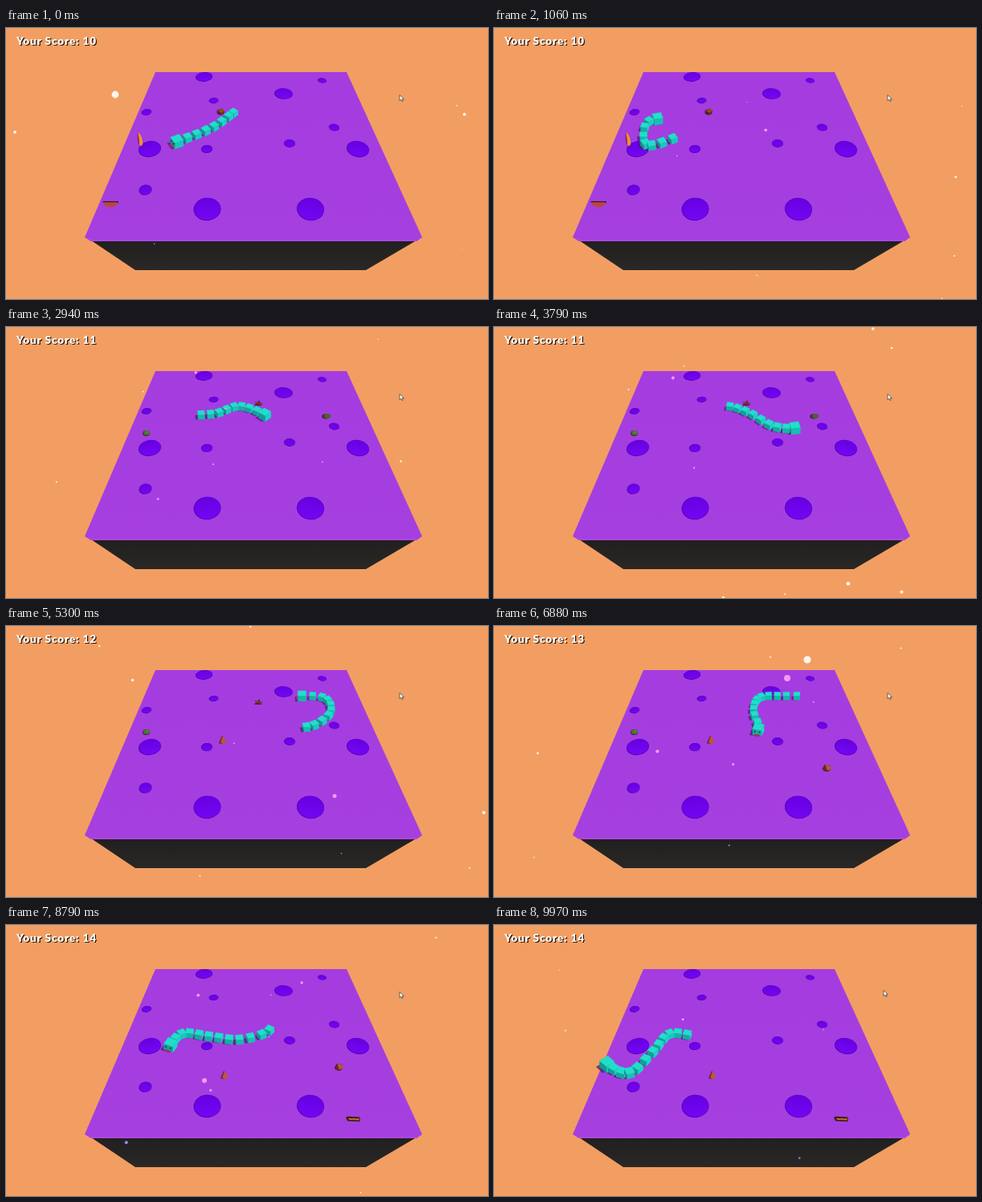
An HTML page that plays this animation: 600 by 338 pixels, repeating every 10 s.

```html
<!DOCTYPE html>
<html lang="en">
<head>
<meta charset="utf-8">
<title>Snake on a cheese block</title>
<style>
html, body { margin: 0; width: 100%; height: 100%; overflow: hidden; background: #f29e62; }
svg { display: block; width: 600px; height: 338px; }
text { font: 900 13.5px Lato, sans-serif; letter-spacing: .9px; }
</style>
</head>
<body>
<svg viewBox="0 0 600 338">
  <defs>
    <linearGradient id="top" x1="0" y1="0" x2="0" y2="1">
      <stop offset="0" stop-color="#a43cdf"/><stop offset="1" stop-color="#a63fe0"/>
    </linearGradient>
    <linearGradient id="side" x1="0" y1="0" x2="0" y2="1">
      <stop offset="0" stop-color="#211f1f"/><stop offset="1" stop-color="#2a2826"/>
    </linearGradient>
    <linearGradient id="pit" x1="0" y1="0" x2="0" y2="1">
      <stop offset="0" stop-color="#6600e0"/><stop offset="1" stop-color="#7406f4"/>
    </linearGradient>
  </defs>
  <rect width="600" height="338" fill="#f29e62"/>
  <path d="M106 265H511L448 302H161Z" fill="url(#side)"/>
  <path d="M186 55H424L518 261L511 266H106L98 261Z" fill="url(#top)"/>
  <path d="M98 261L106 266H511L518 261L511 264H106Z" fill="#ab46e0"/>
  <g id="pits"></g>
  <g id="live"></g>
  <text id="shade" x="14.2" y="22.2" fill="#2b1a10"></text>
  <text id="score" x="13" y="21" fill="#fff"></text>
  <path id="cursor" d="M0 0V7.2L1.8 5.6L3 8.2L4.2 7.6L3.1 5.2H5.4Z" fill="#fff" stroke="#333" stroke-width=".7"/>
</svg>
<script>
const $ = id => document.getElementById(id);
const LOOP = 10, STEP = 0.1689, LEAD = 7, STRIDE = 3;

// perspective of the board: size and vertical squash at height y
const scale = y => (238 + .875 * (y - 55)) / 300;
const squash = y => .45 + .0017 * y;

const bigPits = [[246.5, 61], [345.5, 82], [179, 151], [438, 151], [250.5, 226], [379, 226]];
const smallPits = [[393.5, 65.5], [258.5, 90.5], [175, 105], [408.5, 124], [353, 144], [250, 151], [173.5, 202]];
function pit(x, y, size) {
  const rx = size * scale(y), ry = rx * squash(y);
  return `<g transform="translate(${x} ${y}) rotate(${(x - 300) / 11})">` +
    `<ellipse rx="${rx}" ry="${ry}" fill="#5500b4"/>` +
    `<ellipse cx=".3" cy="-.3" rx="${rx - .6}" ry="${ry - .6}" fill="url(#pit)"/></g>`;
}
$('pits').innerHTML = bigPits.map(([x, y]) => pit(x, y, 13.2)).join('') +
  smallPits.map(([x, y]) => pit(x, y, 6.7)).join('');

// head route: a key point every STRIDE segment spacings
const route = [
  [283, 106], [259, 123], [226, 137], [190, 146], [191, 118], [226, 111], [261, 108], [289.5, 99],
  [318, 107.5], [348, 124], [380, 125], [404, 108], [396.5, 90], [361, 87.5], [331, 89.5], [323, 106],
  [328, 131], [291, 143], [253, 139], [219, 136], [198, 158], [169, 184.5], [141, 174], [128, 150]
];
const last = route.length - 1;
const clamp = (v, lo, hi) => Math.max(lo, Math.min(hi, v));

function at(u) {
  const i = Math.floor(u), f = u - i;
  const [a, b, d, e] = [-1, 0, 1, 2].map(k => route[clamp(i + k, 0, last)]);
  return [0, 1].map(c => b[c] + f * (d[c] - a[c] +
    f * (2 * a[c] - 5 * b[c] + 4 * d[c] - e[c] + f * (3 * (b[c] - d[c]) + e[c] - a[c]))) / 2);
}

function pose(step) {
  const u = clamp(step / STRIDE, 0, last), v = clamp(u, .05, last - .05);
  const [x, y] = at(u), p = at(v - .05), q = at(v + .05);
  return { x, y, ang: Math.atan2((q[1] - p[1]) / squash(y), q[0] - p[0]) };
}

const poly = (pts, fill, more = '') =>
  `<polygon points="${pts.map(p => p.map(n => n.toFixed(2)).join()).join(' ')}" fill="${fill}" ${more}/>`;

function block({ x, y, ang }, half, isHead) {
  const k = squash(y), a = half * scale(y), h = a * Math.sqrt(1 - k * k) * .85;
  const co = Math.cos(ang), si = Math.sin(ang);
  const spot = (f, s, z) => [x + a * (f * co - s * si), y + a * k * (f * si + s * co) - z * h];
  const ring = [[1, 1], [-1, 1], [-1, -1], [1, -1]];
  const base = ring.map(([f, s]) => spot(f, s, -1)), roof = ring.map(([f, s]) => spot(f, s, 1));
  const shadow = poly(base.map(([px, py]) => [px - a * .65, py]), '#43206a', 'opacity=".75"');
  let body = '';
  for (let i = 0; i < 4; i++) {
    const j = (i + 1) % 4, n = ang + Math.PI / 2 * (i + 1);
    if (Math.sin(n) < .02) continue;
    const l = .84 + .18 * Math.cos(n);
    body += poly([base[i], base[j], roof[j], roof[i]], `rgb(${26 * l},${216 * l},${202 * l})`);
  }
  body += poly(roof, '#20dfca', 'stroke="#1bcfbe" stroke-width=".3"');
  if (isHead && co < .35 && si > -.2) {
    const mouth = poly([spot(1, .6, -.5), spot(1.45, .6, -.7), spot(1.45, -.6, -.7), spot(1, -.6, -.5)], '#a83068');
    const eyes = [-.5, .5].map(s => spot(1, s, .3))
      .map(([ex, ey]) => `<circle cx="${ex}" cy="${ey}" r="1" fill="#17343c"/>`).join('');
    body = si > .4 ? body + mouth + eyes : mouth + body;
  }
  return { y, shadow, body };
}

const meals = [2.02, 4.25, 6, 7.95];

function snake(t, eaten) {
  const parts = [];
  for (let i = 0; i < 8 + eaten; i++) {
    const p = pose(t / STEP + LEAD - i);
    if (i > 7 && i === 7 + eaten) {
      const lag = Math.max(0, 1 - (t - meals[eaten - 1]) / .4);
      p.x += 26 * lag;
      p.y += 13 * lag;
    }
    parts.push(block(p, i ? 4.5 : 5.9, !i));
  }
  parts.sort((a, b) => a.y - b.y);
  return parts.map(p => p.shadow).join('') + parts.map(p => p.body).join('');
}

const art = {
  burger: '<ellipse cx="-1" cy="1" rx="4.6" ry="3.4" fill="#4a2033"/><path d="M-4 0L0-4.4L4-1L1 4Z" fill="#8a4a1c"/><path d="M-3 1L1 2.6L4 0" stroke="#4c2a12" fill="none"/>',
  banana: '<path d="M-3-9Q-4 0-1 7L0 8Q-1-2-1-9Z" fill="#8d2455"/><path d="M-2.5-9Q-1 0-.5 7L2.5 6.5Q4.5-1-1-9Z" fill="#f0952f"/>',
  melon: '<path d="M-10-3H10Q8 4.5 0 4.5Q-7 4.5-10-3Z" fill="#bb4538"/><path d="M-10-3H10L9-.5L8-1.8H-9Z" fill="#3b1a2a"/>',
  lime: '<ellipse cx="-.5" cy=".6" rx="4.5" ry="3.5" fill="#43204c"/><ellipse rx="4" ry="3" fill="#47752a"/><ellipse cx="1" cy="-.8" rx="1.6" ry="1" fill="#5b9434"/>',
  olive: '<ellipse cx="-1" cy=".4" rx="4.8" ry="3" fill="#402344"/><ellipse cx="1" rx="4" ry="2.9" fill="#4d622a"/><path d="M-5 0L-2-1.5V1.5Z" fill="#6d4128"/>',
  nuts: '<path d="M-5 3L-3 0L-4-2L-1-1L1-4L2-1L5 0L4 3Z" fill="#542330"/><path d="M-3 1L-1-1L1 1L3 0L4 2" fill="none" stroke="#a34931"/>',
  cone: '<path d="M-5 4L-1-5L0-5V5H-3Z" fill="#5e2640"/><path d="M-3 4L0-5L4.5 3L1 5Z" fill="#bd592e"/>',
  wedge: '<path d="M-6 1L-3-4L4-3L5 2L1 5L-4 4Z" fill="#5c2638"/><path d="M-2-4L4-2.5L5.5 2L0 3Z" fill="#b85a2b"/>',
  dog: '<path d="M-9-2L-7-3.2L8-2.6L9 1L8 3.2L-7 2.6Z" fill="#3f1f18"/><path d="M-6-1L8-.6L8 1.6L-5 1Z" fill="#a65522"/><path d="M-5-.4L-2 .6L1-.4L4 .7L7 0" fill="none" stroke="#d9a43a" stroke-width=".7"/>'
};

// kind, x, y, appears, leaves
const food = [
  ['burger', 268, 104, 0, meals[0]], ['banana', 167, 140, 0, 1.2], ['melon', 130, 219, 0, 1.6],
  ['olive', 399, 111, 1.2, meals[1]], ['lime', 175, 132, 1.6, 7.6], ['nuts', 314, 95, 2.2, meals[2]],
  ['cone', 270, 142, meals[1], meals[3]], ['wedge', 414.5, 177, meals[2], 9.4],
  ['dog', 432, 242, 7.6, LOOP], ['cone', 272, 187, meals[3], LOOP]
];
const table = t => food.filter(f => t >= f[3] && t < f[4])
  .map(([kind, x, y]) => `<g transform="translate(${x} ${y})">${art[kind]}</g>`).join('');

// drifting motes: a few large ones, the rest scattered
let seed = 11;
const rnd = () => (seed = seed * 16807 % 2147483647) / 2147483647;
const motes = [];
const add = (x, y, r, peak) => motes.push({
  x, y, r, peak, life: .45 + .4 * rnd(),
  vx: (x - 305) * .05 + rnd() * 16 - 8, vy: (y - 160) * .05 + rnd() * 16 - 8
});
[[136, 83, 4.4, 0], [244, 79, 5, 2.12], [414, 17, 2.3, 2.12], [441, 320, 2.3, 3.79],
  [409, 212, 2.5, 5.3], [390, 42, 4.6, 6.88], [365, 65, 4, 6.88], [247, 194, 3, 8.79]].forEach(m => add(...m));
for (let i = 0; i < 72; i++) add(rnd() * 600, rnd() * 338, .8 + 1.4 * rnd() ** 2, LOOP * i / 71);

function tint(x, y) {
  if (y > 55 && y < 266 && Math.abs(x - 306) < 119 + (y - 55) * .44) return '#f09cf6';
  if (y >= 266 && y < 302 && Math.abs(x - 305) < 202 - (y - 266) * 1.6) return '#a184ec';
  return '#fff5ec';
}

const dust = t => motes.map(m => {
  const d = t - m.peak, grow = Math.min(1, 4 * (1 - Math.abs(d) / m.life));
  if (grow <= 0) return '';
  const x = m.x + m.vx * d, y = m.y + m.vy * d;
  return `<circle cx="${x.toFixed(2)}" cy="${y.toFixed(2)}" r="${(m.r * grow).toFixed(2)}" fill="${tint(x, y)}"/>`;
}).join('');

function draw() {
  const t = performance.now() / 1000 % LOOP;
  const eaten = meals.filter(m => t >= m).length;
  $('live').innerHTML = table(t) + snake(t, eaten) + dust(t);
  $('score').textContent = $('shade').textContent = 'Your Score: ' + (10 + eaten);
  const slip = clamp((t - 9.75) / .22, 0, 1);
  $('cursor').setAttribute('transform', `translate(${490 - 5 * slip} ${83.5 - 2 * slip})`);
  requestAnimationFrame(draw);
}
draw();
</script>
</body>
</html>
```
